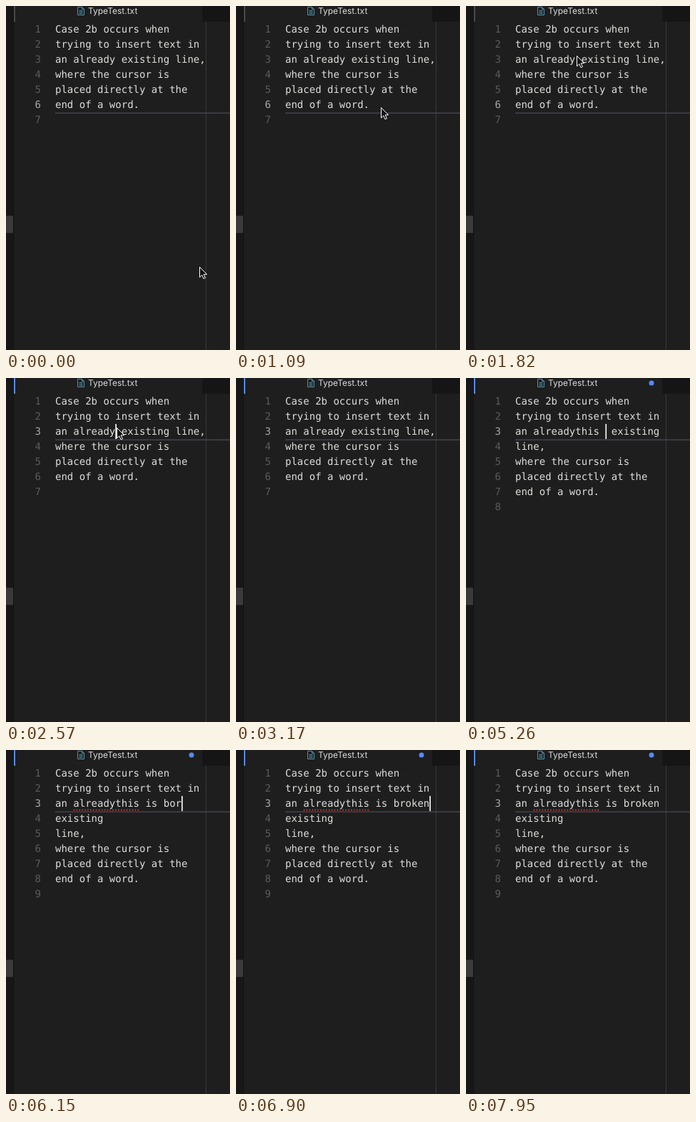
An HTML page that plays this animation: 314 px wide and 479 px high, repeating every 8000 ms.

```html
<!DOCTYPE html>
<html lang="en">
<head>
<meta charset="utf-8">
<title>Editor</title>
<style>
html, body { margin: 0; width: 100%; height: 100%; overflow: hidden; background: #1e1e1e; }
svg { display: block; }
text { white-space: pre; text-rendering: geometricPrecision; }
.code text { font: 14px "DejaVu Sans Mono", Menlo, monospace; fill: #dededc; }
.code .num { fill: #5b5b5b; text-anchor: end; }
.code .num.on { fill: #a9a9a9; }
.title { font: 12px Inter, Roboto, sans-serif; fill: #dcdcdc; }
</style>
</head>
<body>
<svg width="314" height="479" viewBox="0 0 314 479">
  <rect width="314" height="479" fill="#1e1e1e"/>
  <rect width="10" height="479" fill="#171717"/>
  <rect x="10" width="1" height="479" fill="#121212"/>
  <rect y="292" width="10" height="24" fill="#3a3a3a"/>
  <rect x="275" width="39" height="22" fill="#151515"/>
  <rect id="bar" x="11" width="2" height="22"/>
  <path d="M100.5 1.5h6l3 3v8h-9zM106.5 1.5v3h3M102.5 6.5h5M102.5 8.5h5M102.5 10.5h5" fill="none" stroke="#4f91ab"/>
  <text class="title" x="115" y="11.3" textLength="">TypeTest.txt</text>
  <circle id="dot" cx="260" cy="7" r="3.5" fill="#568af2"/>
  <rect x="280" y="22" width="1" height="457" fill="#3a3a3c"/>
  <rect id="rule" x="69" width="245" height="1.4" fill="#454654"/>
  <g id="code" class="code"></g>
  <path id="spell" fill="none" stroke="#d8393a" stroke-width="2" stroke-linecap="round" stroke-dasharray="0 3.9"/>
  <rect id="caret" y="64" width="1.7" height="21" fill="#f4f4f4"/>
  <path id="mouse" d="M.5 .5V14.8L3.8 11.7L6 16.7L8.4 15.6L6.2 10.7H10.6Z" fill="#111" stroke="#fff"/>
</svg>
<script>
const LOOP = 8000, LEFT = 69, TOP = 22, ROW = 21, CHAR = 8.428, WRAP = 25;
const $ = id => document.getElementById(id);

// Typed text after "already", by time
const typing = [
  [0, ''], [3920, 't'], [5120, 'thi'], [5260, 'this '], [5410, 'this i'],
  [5550, 'this is'], [5700, 'this is '], [6000, 'this is b'], [6150, 'this is bor'],
  [6300, 'this is b'], [6450, 'this is br'], [6600, 'this is bro'],
  [6750, 'this is brok'], [6900, 'this is broken']
];
// Pointer tip: time, x, y
const pointer = [
  [0, 271, 363], [500, 264, 332], [650, 234, 228], [790, 204, 145],
  [1090, 203, 141], [1240, 196, 126], [1380, 184, 106], [1530, 170, 86],
  [1680, 159, 73], [1820, 155, 69]
];
const caretOff = [[0, 2420], [3170, 3620], [4370, 4820], [7200, 7500], [7950, LOOP]];

const at = (keys, t) => keys.findLast(k => k[0] <= t);
const set = (el, attrs) => { for (const k in attrs) el.setAttribute(k, attrs[k]); };
const show = (el, on) => { el.style.display = on ? '' : 'none'; };

function wrapLine(typed) {
  const start = 'an already' + typed;
  if ((start + ' existing line,').length <= WRAP) return [start + ' existing line,'];
  if ((start + ' existing').length <= WRAP) return [start + ' existing', 'line,'];
  return [start, 'existing', 'line,'];
}

function layout(typed, active) {
  const lines = ['Case 2b occurs when', 'trying to insert text in', ...wrapLine(typed),
    'where the cursor is', 'placed directly at the', 'end of a word.', ''];
  return lines.map((line, i) => {
    const y = TOP + ROW * i + 15.2;
    return `<text class="num${i + 1 === active ? ' on' : ''}" x="49" y="${y}">${i + 1}</text>` +
      `<text x="${LEFT}" y="${y}">${line}</text>`;
  }).join('');
}

let last = '';
function draw(now) {
  const t = now % LOOP;
  const typed = at(typing, t)[1];
  const active = t < 2420 ? 6 : 3;
  const key = typed + active;
  if (key !== last) {
    $('code').innerHTML = layout(typed, active);
    last = key;
  }
  set($('bar'), { fill: t < 1970 ? '#4a4a4a' : '#568af2' });
  set($('rule'), { y: TOP + ROW * active + 0.4 });
  show($('dot'), t >= 4370);

  // The caret lags behind the first keystroke
  const column = 10 + (t < 4070 ? 0 : typed.length);
  set($('caret'), { x: LEFT + CHAR * column });
  show($('caret'), !caretOff.some(([a, b]) => t >= a && t < b));

  const misspelt = t >= 6000 ? 11 : t >= 4370 && t < 5120 ? 8 : 0;
  set($('spell'), { d: `M95.5 83.6h${Math.max(0, misspelt * CHAR - 2)}` });
  show($('spell'), misspelt);

  const [, x, y] = at(pointer, t);
  set($('mouse'), { transform: `translate(${x} ${y})` });
  show($('mouse'), t < 2720);
  requestAnimationFrame(() => draw(performance.now()));
}
document.querySelector('.title').removeAttribute('textLength');
draw(performance.now());
</script>
</body>
</html>
```
